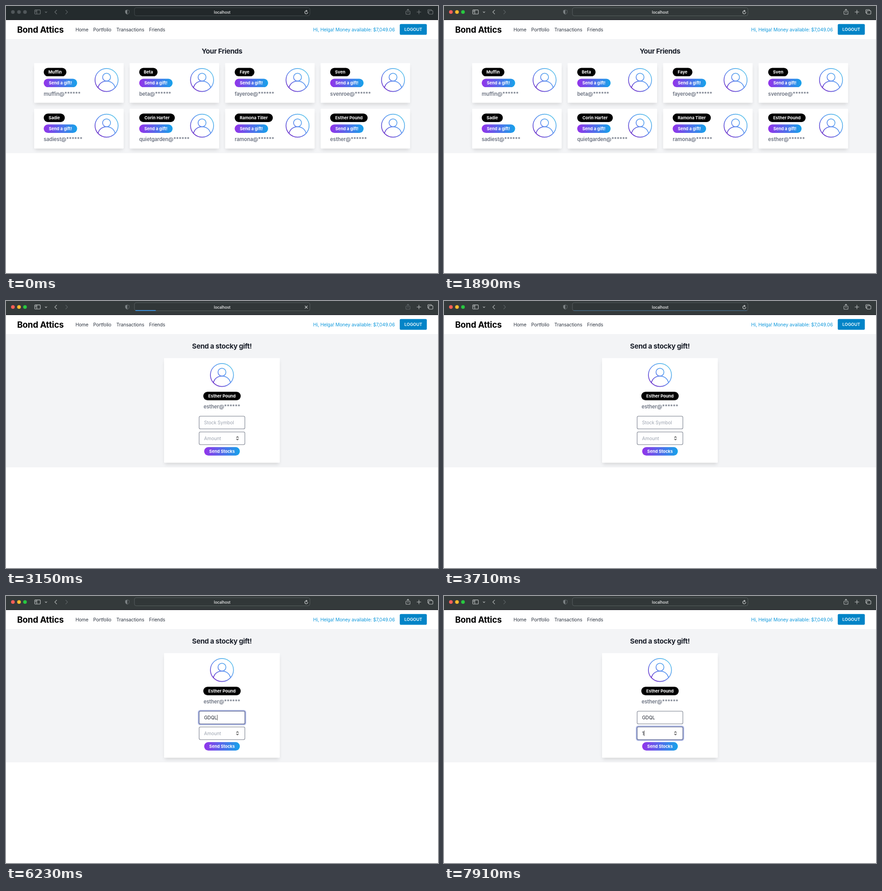
These frames come from a looping animation (951x589 px, 8 s). An HTML page:

```html
<!DOCTYPE html>
<html lang="en">
<head>
<meta charset="utf-8">
<title>Send a gift</title>
<style>
  html, body { margin: 0; width: 100%; height: 100%; overflow: hidden; background: #fff; }
  svg { display: block; width: 951px; height: 589px; font-family: Inter, "Open Sans", sans-serif; }
  .brand { font-size: 18.7px; font-weight: 700; letter-spacing: -.25px; fill: #000; }
  .nav { font-size: 10.25px; letter-spacing: -.08px; fill: #2b323e; }
  .money { fill: #0d98dc; }
  .title { font-size: 15.2px; font-weight: 700; letter-spacing: -.33px; fill: #1b202b; }
  .pill { font-size: 9.24px; font-weight: 700; fill: #fff; }
  .mail { font-size: 11.2px; font-weight: 600; letter-spacing: -.1px; fill: #6b7280; }
  .hint { fill: #9ca3af; }
  .typed { fill: #1b202b; }
  .url { font-size: 8.4px; font-weight: 500; fill: #f4f5f5; }
  .mid { text-anchor: middle; }
  .end { text-anchor: end; }
  .line { fill: none; stroke-width: 1.1; stroke-linecap: round; stroke-linejoin: round; }
  .shade { filter: blur(4px); }
</style>
</head>
<body>
<svg id="stage" viewBox="0 0 951 589" xmlns="http://www.w3.org/2000/svg">
  <defs>
    <linearGradient id="pillFill">
      <stop offset="0" stop-color="#9333ea"/>
      <stop offset="1" stop-color="#16a3ea"/>
    </linearGradient>
    <linearGradient id="avatarLine" gradientUnits="userSpaceOnUse" x1="-19" y1="21" x2="19" y2="-21">
      <stop offset="0" stop-color="#6a28c8"/>
      <stop offset=".5" stop-color="#5a8ff0"/>
      <stop offset="1" stop-color="#5ac4ea"/>
    </linearGradient>
    <g id="avatar" fill="none" stroke="url(#avatarLine)" stroke-width="1.7">
      <circle r="25.4"/>
      <circle cy="-6.2" r="8.7"/>
      <path d="M-18.9 17C-16.5 7.5 -9 2.4 0 2.4S16.5 7.5 18.9 17"/>
    </g>
  </defs>
  <rect width="951" height="589" fill="#fff"/>
  <g id="page"></g>
  <g id="toolbar"></g>
</svg>
<script>
const LOOP = 8000, STEP = 70;
const FOCUS_WINDOW = 1890, LOAD_START = 2520, PAGE_SWAP = 3150, LOAD_END = 3360, LOAD_GONE = 3780;
const FOCUS_SYMBOL = 4550, FOCUS_AMOUNT = 7560;
const SYMBOL = 'GDQL', SYMBOL_KEYS = [5600, 5740, 5950, 6160];
const AMOUNT = '1', AMOUNT_KEYS = [7630];
const CARET_OFF = [[5040, 5600], [6580, 7070]];

const friends = [
  ['Muffin', 'muffin', 50], ['Beta', 'beta', 40.5], ['Faye', 'fayeroe', 43.5], ['Sven', 'svenroe', 44],
  ['Sadie', 'sadiest', 46.5], ['Corin Harter', 'quietgarden', 78.5],
  ['Ramona Tiller', 'ramona', 84], ['Esther Pound', 'esther', 82.5]
];

const $ = id => document.getElementById(id);
const rect = (x, y, w, h, fill, more = '') =>
  `<rect x="${x}" y="${y}" width="${w}" height="${h}" fill="${fill}" ${more}/>`;
const text = (x, y, cls, str, more = '') =>
  `<text x="${x}" y="${y}" class="${cls}" ${more}>${str}</text>`;
const pill = (x, y, w, fill, str) =>
  rect(x, y, w, 18.6, fill, 'rx="9.3"') + text(x + w / 2, y + 12.6, 'pill mid', str);
const avatar = (x, y) => `<use href="#avatar" x="${x}" y="${y}"/>`;
const mail = user => user + '@******';
const panel = (x, y, w, h) =>
  rect(x + 2, y + 7, w - 4, h - 4, '#000', 'class="shade" opacity=".13"') +
  rect(x, y, w, h, '#fff', 'rx="1.3"');

function friendCard([name, user, width], i) {
  const x = 62 + (i % 4) * 210.2, y = 126 + Math.floor(i / 4) * 100.8;
  return panel(x, y, 197, 87.6) +
    pill(x + 21, y + 10.5, width, '#000', name) +
    pill(x + 21, y + 34.5, 73.6, 'url(#pillFill)', 'Send a gift!') +
    text(x + 21, y + 71.6, 'mail', mail(user)) +
    avatar(x + 159.4, y + 37.2);
}

function field(id, y, hint) {
  return rect(423.7, y - 1.3, 103.6, 31, 'none', `id="${id}Ring" rx="4" stroke="#a9b4e4" stroke-width="2.6"`) +
    rect(425.2, y + .2, 100.6, 28, '#fff', `id="${id}Box" rx="2.8" stroke-width="1.3"`) +
    text(436, y + 17.9, 'nav hint', hint, `id="${id}Hint"`) +
    text(436, y + 17.9, 'nav typed', '', `id="${id}Text"`) +
    rect(436, y + 8.2, .9, 12, '#222', `id="${id}Caret"`);
}

function buildPage() {
  const [name, user, width] = friends[7];
  const nav = [[153, 'Home'], [192, 'Portfolio'], [243, 'Transactions'], [315, 'Friends']];
  $('page').innerHTML =
    text(24.5, 58.8, 'brand', 'Bond Attics') +
    nav.map(([x, label]) => text(x, 55.6, 'nav', label)).join('') +
    text(856, 55.6, 'nav money end', 'Hi, Helga! Money available: $7,049.06') +
    rect(866.8, 39.8, 59.6, 23.8, '#0284c7', 'rx="2.8"') +
    text(896.6, 55.1, 'pill mid', 'LOGOUT', 'style="font-weight:600"') +
    `<g id="friendsPage">${rect(0, 73, 951, 251.6, '#f3f4f6')}
      ${text(475.5, 105.4, 'title mid', 'Your Friends')}
      ${friends.map(friendCard).join('')}</g>
    <g id="giftPage">${rect(0, 73, 951, 294, '#f3f4f6')}
      ${text(475.3, 105.4, 'title mid', 'Send a stocky gift!')}
      ${panel(348, 126, 254.7, 230.8)}
      ${avatar(475.4, 163.2)}
      ${pill(475.5 - width / 2, 200.3, width, '#000', name)}
      ${text(475.3, 237.4, 'mail mid', mail(user))}
      ${field('symbol', 254, 'Stock Symbol')}
      ${field('amount', 288.6, 'Amount')}
      ${rect(505.8, 297, 7.4, 11.6, '#f4f4f4', 'rx="2.5"')}
      <path class="line" stroke="#333" d="M507.6 301.2l1.9-2 1.9 2M507.6 304.4l1.9 2 1.9-2"/>
      ${pill(436.2, 322.3, 78.6, 'url(#pillFill)', 'Send Stocks')}</g>`;
}

function buildToolbar() {
  const icon = (d, id = '') => `<path class="line" ${id && `id="${id}"`} d="${d}"/>`;
  $('toolbar').innerHTML =
    rect(0, 0, 951, 30, '#343a3b', 'id="bar"') + rect(0, 30, 951, 1, '#15131c') +
    [15.2, 28.6, 41.8].map((x, i) => `<circle id="light${i}" cx="${x}" cy="13.3" r="4"/>`).join('') +
    rect(282.8, 3.8, 386.2, 17.8, '#000', 'id="urlBox" rx="4" fill-opacity=".06" stroke="#5b6263" stroke-width="1"') +
    text(476, 16.6, 'url mid', 'localhost') +
    `<g id="icons">
      ${icon('M64.6 8.6h9.6q1.4 0 1.4 1.4v6.4q0 1.4-1.4 1.4h-9.6q-1.4 0-1.4-1.4V10q0-1.4 1.4-1.4zM67.8 8.6v9.2M64.8 11h1.4M64.8 13h1.4')}
      ${icon('M86.2 12.7l1.9 1.9 1.9-1.9')}
      ${icon('M111.6 9.2l-4.2 4.2 4.2 4.2')}
      ${icon('M909 9v8.6M904.7 13.3h8.6')}
      ${icon('M930.6 15.6h-.8q-1.2 0-1.2-1.2V9.2q0-1.2 1.2-1.2h6q1.2 0 1.2 1.2v.9M932 10.3h6.5q1.2 0 1.2 1.2v5.3q0 1.2-1.2 1.2H932q-1.2 0-1.2-1.2v-5.3q0-1.2 1.2-1.2z')}
    </g>
    <g stroke="#5f6668">
      ${icon('M131.4 9.2l4.2 4.2-4.2 4.2')}
      ${icon('M267 8.5l4.2 1.4v3.6q0 3-4.2 4.8q-4.2-1.8-4.2-4.8V9.9z')}
      <path fill="#7b8183" stroke="none" d="M267 8.5v9.8q-4.2-1.8-4.2-4.8V9.9z"/>
    </g>
    ${icon('M882.6 11.2h-1.2q-1 0-1 1v5q0 1 1 1h7q1 0 1-1v-5q0-1-1-1h-1.2M884.9 14.6V7.2M882.7 9.2l2.2-2.2 2.2 2.2', 'share')}
    <g stroke="#d9dcdc">
      ${icon('M662.8 11.2A3.3 3.3 0 1 0 664.3 13.8M661 9.2l2 2-2 1.8', 'reload')}
      ${icon('M658.2 10.8l5.4 5.4M663.6 10.8l-5.4 5.4', 'stop')}
    </g>` +
    rect(285, 20.1, 0, 1.7, '#3a9cf2', 'id="progress"');
}

const set = (id, attrs) => {
  for (const key in attrs) $(id).setAttribute(key, attrs[key]);
};
const show = (id, on) => set(id, { visibility: on ? 'inherit' : 'hidden' });
const clamp = v => Math.max(0, Math.min(1, v));

function drawToolbar(t) {
  const active = t >= FOCUS_WINDOW, loading = t >= LOAD_START && t < LOAD_END;
  set('bar', { fill: active ? '#343a3b' : '#242b2d' });
  set('urlBox', { stroke: active ? '#596061' : '#454c4e' });
  set('icons', { stroke: active ? '#c3c7c7' : '#777d7f' });
  set('share', { stroke: loading ? '#5f6668' : active ? '#b3b8b8' : '#777d7f' });
  ['#ff5f57', '#febc2e', '#28c840'].forEach((c, i) => set('light' + i, { fill: active ? c : '#50575a' }));
  show('reload', !loading);
  show('stop', loading);

  const slow = 45.5 * (1 - Math.exp(-(t - LOAD_START) / 160));
  const finish = clamp((t - LOAD_END + STEP) / 210);
  const fade = clamp((LOAD_GONE - t) / 280);
  show('progress', t >= LOAD_START && t < LOAD_GONE);
  set('progress', { width: Math.max(0, slow + (382 - slow) * finish), opacity: fade });
}

function drawField(id, value, focused, caretOn) {
  const label = $(id + 'Text');
  label.textContent = value;
  show(id + 'Hint', !value);
  show(id + 'Ring', focused);
  show(id + 'Caret', focused && caretOn);
  set(id + 'Box', { stroke: focused ? '#626b91' : '#8b909c' });
  set(id + 'Caret', { x: 436 + (value ? label.getComputedTextLength() + .2 : 0) });
}

function draw(t) {
  const typed = (word, keys) => word.slice(0, keys.filter(k => t >= k).length);
  const caretOn = !CARET_OFF.some(([from, to]) => t >= from && t < to);
  drawToolbar(t);
  show('friendsPage', t < PAGE_SWAP);
  show('giftPage', t >= PAGE_SWAP);
  drawField('symbol', typed(SYMBOL, SYMBOL_KEYS), t >= FOCUS_SYMBOL && t < FOCUS_AMOUNT, caretOn);
  drawField('amount', typed(AMOUNT, AMOUNT_KEYS), t >= FOCUS_AMOUNT, caretOn);
}

buildPage();
buildToolbar();
const start = performance.now();
function tick() {
  const t = (performance.now() - start) % LOOP;
  draw(Math.floor(t / STEP) * STEP);
  requestAnimationFrame(tick);
}
tick();
</script>
</body>
</html>
```
